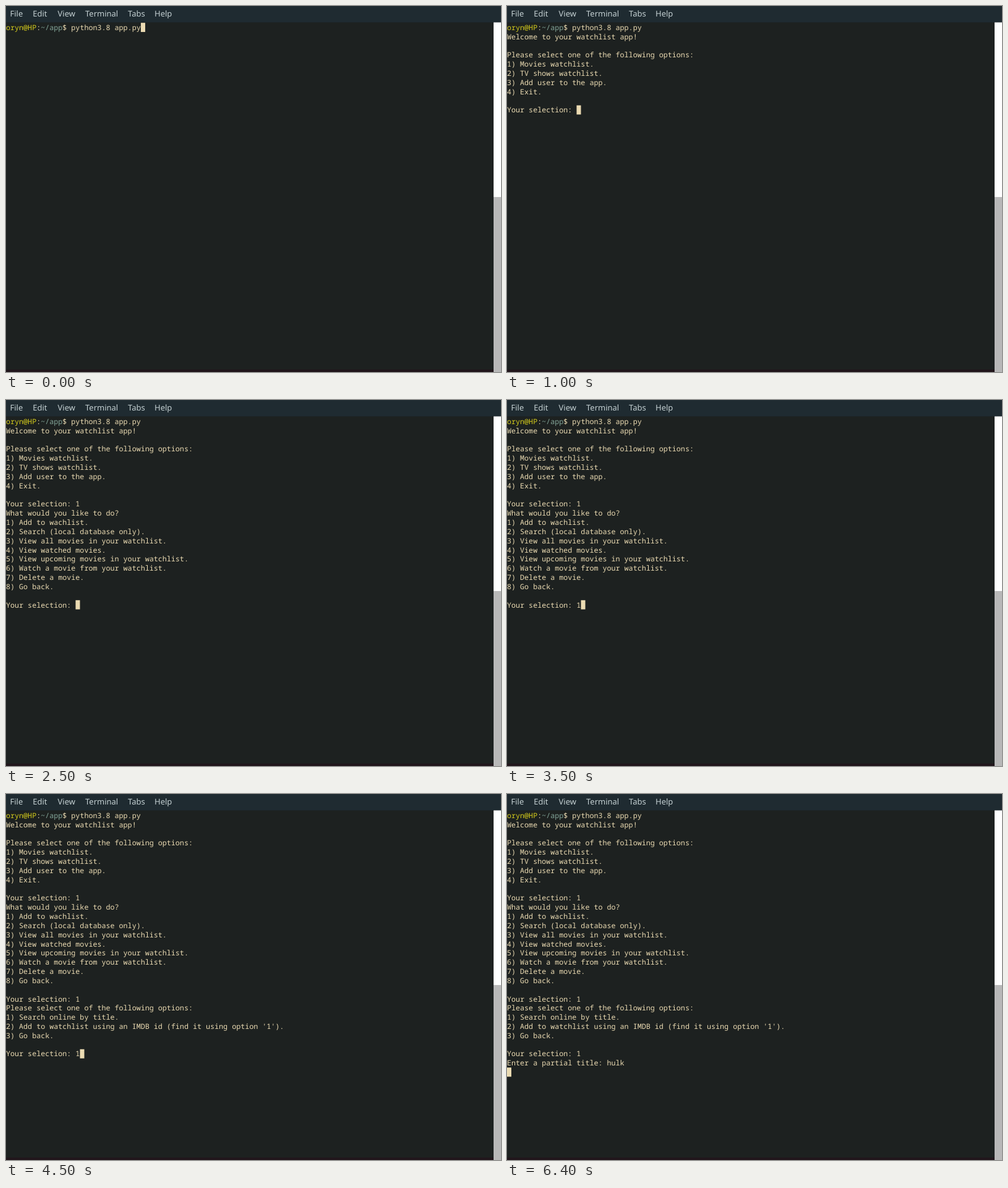
An HTML page for the animation above (8000 ms loop, 800 px wide and 592 px high).

```html
<!DOCTYPE html>
<html lang="en">
<head>
<meta charset="utf-8">
<title>Watchlist terminal</title>
<style>
  html, body { margin: 0; width: 100%; height: 100%; overflow: hidden; background: #1d2120; }
  svg { display: block; width: 800px; height: 592px; }
  text { white-space: pre; text-rendering: geometricPrecision; }
  .menu text { font: 13px "Noto Sans", "Open Sans", sans-serif; fill: #c3cfd1; }
  .term text { font: 500 11.715px "Noto Sans Mono", "DejaVu Sans Mono", monospace; fill: #ebdbb2; }
  .term .user { fill: #d5cc1c; }
  .term .path { fill: #83a598; }
</style>
</head>
<body>
<svg viewBox="0 0 800 592">
  <rect width="800" height="592" fill="#1d2120"/>
  <rect y="588" width="788" height="4" fill="#21161b"/>
  <rect width="800" height="26.5" fill="#1f2b31"/>
  <rect x="788" y="26.5" width="12" height="283" fill="#fefefe"/>
  <rect x="788" y="309" width="12" height="283" fill="#b8b8b8"/>
  <g class="menu">
    <text x="6.5" y="17">File</text>
    <text x="43.3" y="17">Edit</text>
    <text x="83.5" y="17">View</text>
    <text x="128" y="17">Terminal</text>
    <text x="197" y="17">Tabs</text>
    <text x="240" y="17">Help</text>
  </g>
  <g class="term">
    <rect id="cursor" width="7.03" height="14.83" fill="#ebdbb2"/>
    <text y="38.9"><tspan class="user">oryn@HP</tspan>:<tspan class="path">~/app</tspan>$ python3.8 app.py</text>
    <g id="output"></g>
  </g>
</svg>
<script>
const LOOP = 8000, CELL = 7.03, ROW = 14.83, TOP = 27.2, BASE = 38.9;
const PROMPT_COLUMNS = 31;

const mainMenu = `Welcome to your watchlist app!

Please select one of the following options:
1) Movies watchlist.
2) TV shows watchlist.
3) Add user to the app.
4) Exit.

Your selection: `;

const movieMenu = `
What would you like to do?
1) Add to wachlist.
2) Search (local database only).
3) View all movies in your watchlist.
4) View watched movies.
5) View upcoming movies in your watchlist.
6) Watch a movie from your watchlist.
7) Delete a movie.
8) Go back.

Your selection: `;

const addMenu = `
Please select one of the following options:
1) Search online by title.
2) Add to watchlist using an IMDB id (find it using option '1').
3) Go back.

Your selection: `;

// Each step appends text to the terminal at the given time.
const steps = [
  [500, "\n"], [1000, mainMenu],
  [2000, "1"], [2500, movieMenu],
  [3500, "1"], [3600, addMenu],
  [4500, "1"], [4600, "\nEnter a partial title: "],
  [5500, "h"], [5700, "u"], [6000, "l"], [6200, "k"], [6400, "\n"]
];

const output = document.getElementById("output");
const cursor = document.getElementById("cursor");
let shown = -1;

function draw(count) {
  const lines = steps.slice(0, count).map(step => step[1]).join("").split("\n");
  output.replaceChildren(...lines.map((line, row) => {
    const text = document.createElementNS(output.namespaceURI, "text");
    text.setAttribute("y", BASE + row * ROW);
    text.textContent = line;
    return text;
  }));
  const row = lines.length - 1;
  const column = row ? lines[row].length : PROMPT_COLUMNS;
  cursor.setAttribute("x", column * CELL);
  cursor.setAttribute("y", TOP + row * ROW);
}

function tick() {
  const time = performance.now() % LOOP;
  const count = steps.filter(step => step[0] <= time).length;
  if (count !== shown) draw(shown = count);
  requestAnimationFrame(tick);
}
tick();
</script>
</body>
</html>
```
